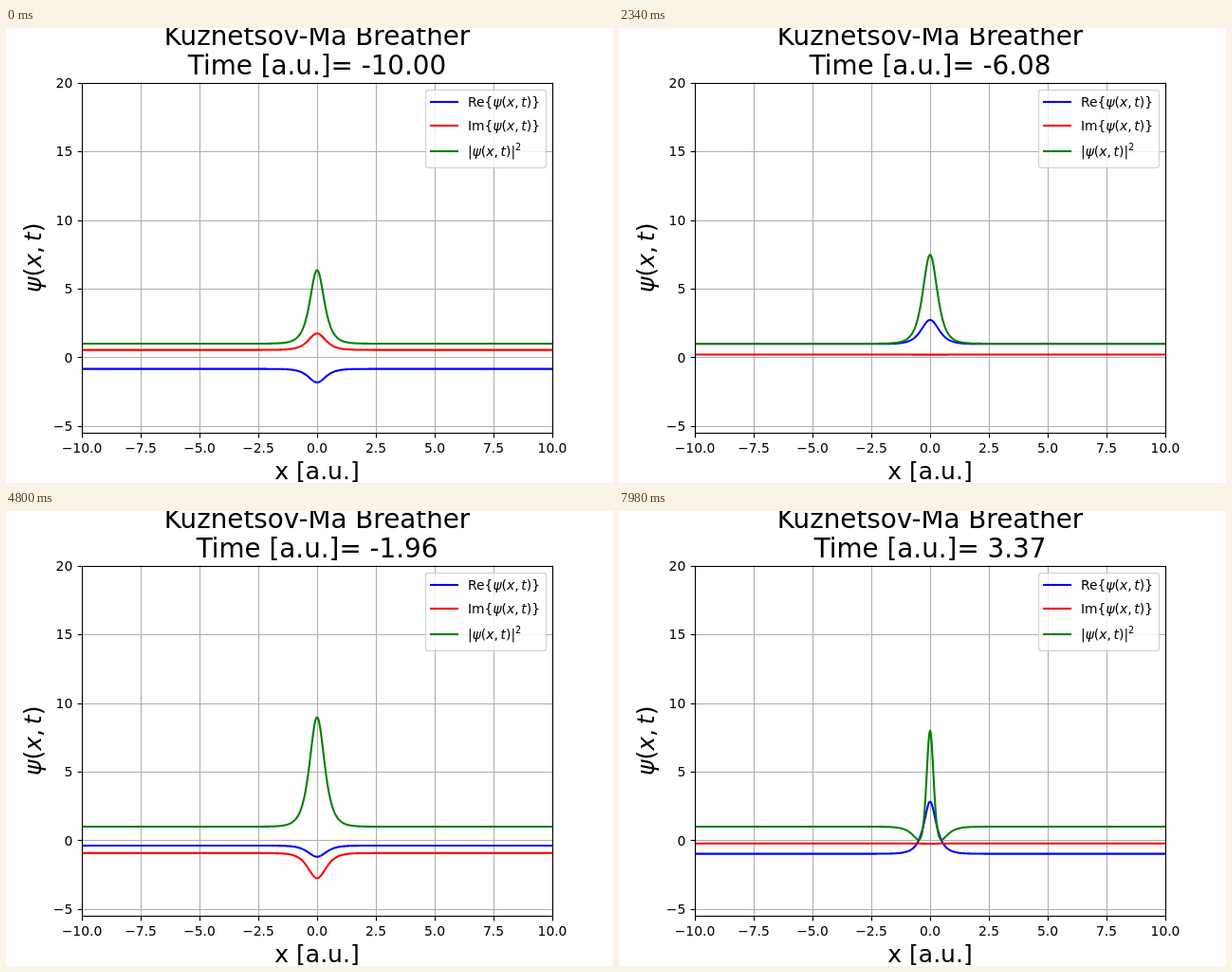
Recreate the animation shown at these times as an HTML page with a canvas. Size 640 by 480 pixels, loop 8 s.

```html
<!DOCTYPE html>
<html lang="en">
<head>
<meta charset="utf-8">
<title>Kuznetsov-Ma Breather</title>
<style>
  html, body { margin: 0; width: 100%; height: 100%; overflow: hidden; background: #fff; }
  canvas { display: block; }
</style>
</head>
<body>
<canvas id="stage" width="640" height="480"></canvas>
<script>
const ctx = document.getElementById('stage').getContext('2d');
const LOOP = 8000, STEP = 60, DT = 20 / 199;
const BOX = { left: 80, right: 576, top: 57.6, bottom: 427.2 };
const PT = 100 / 72;                       // pixels per point
const THIN = 0.8 * PT, THICK = 1.5 * PT, TICK = 3.5 * PT;
const COLORS = ['#0000ff', '#ff0000', '#008000'];

const toX = x => BOX.left + (x + 10) / 20 * (BOX.right - BOX.left);
const toY = y => BOX.bottom - (y + 5.5) / 25.5 * (BOX.bottom - BOX.top);
const snap = v => Math.floor(v + 0.5) + 0.5;
const font = (points, style = '') => `${style} ${points * PT}px "DejaVu Sans", sans-serif`;
const minus = s => s.replace('-', '\u2212');

function line(x1, y1, x2, y2, color, width) {
  ctx.strokeStyle = color;
  ctx.lineWidth = width;
  ctx.beginPath();
  ctx.moveTo(x1, y1);
  ctx.lineTo(x2, y2);
  ctx.stroke();
}

function text(s, x, y, points, align = 'center') {
  ctx.font = font(points);
  ctx.textAlign = align;
  ctx.fillStyle = '#000';
  ctx.fillText(s, x, y);
}

// Variables are oblique, a comma is followed by a thin space, ² is a raised 2.
function math(s, x, y, points) {
  ctx.textAlign = 'left';
  ctx.fillStyle = '#000';
  for (const part of s.match(/[ψxt]|²|,|[^ψxt²,]+/g)) {
    const raised = part === '²';
    const glyphs = raised ? '2' : part;
    ctx.font = font(raised ? points * 0.7 : points, /[ψxt]/.test(part) ? 'oblique' : '');
    ctx.fillText(glyphs, x, raised ? y - 0.43 * points * PT : y);
    x += ctx.measureText(glyphs).width;
    if (part === ',') x += 0.195 * points * PT;
  }
}

// Breather on a unit background: returns [Re, Im, |psi|^2].
const OMEGA = 4 * (Math.SQRT2 - 1), KAPPA = 2 * Math.sqrt(3);
function psi(x, t) {
  const c = Math.cos(OMEGA * t), s = Math.sin(OMEGA * t);
  const d = 2 * Math.cosh(KAPPA * x) - c;
  const a = 1 - 6 * c / d, b = -OMEGA * s / d;
  const re = a * Math.cos(t) - b * Math.sin(t);
  const im = a * Math.sin(t) + b * Math.cos(t);
  return [re, im, re * re + im * im];
}

function drawGrid() {
  for (let x = -10; x <= 10; x += 2.5) {
    const px = snap(toX(x));
    line(px, BOX.top, px, BOX.bottom, '#b0b0b0', THIN);
    line(px, 427.5, px, 427.5 + TICK, '#000', THIN);
    text(minus(x.toFixed(1)), toX(x), 448, 10);
  }
  for (let y = -5; y <= 20; y += 5) {
    const py = snap(toY(y));
    line(BOX.left, py, BOX.right, py, '#b0b0b0', THIN);
    line(80.5 - TICK, py, 80.5, py, '#000', THIN);
    text(minus(String(y)), BOX.left - 2 * TICK, Math.round(toY(y) + 5.1), 10, 'right');
  }
}

function drawCurves(t) {
  ctx.save();
  ctx.beginPath();
  ctx.rect(BOX.left, BOX.top, BOX.right - BOX.left, BOX.bottom - BOX.top);
  ctx.clip();
  ctx.lineWidth = THICK;
  ctx.lineJoin = 'round';
  COLORS.forEach((color, i) => {
    ctx.strokeStyle = color;
    ctx.beginPath();
    for (let n = -500; n <= 500; n++) ctx.lineTo(toX(n / 50), toY(psi(n / 50, t)[i]));
    ctx.stroke();
  });
  ctx.restore();
}

function drawLegend() {
  ctx.beginPath();
  ctx.roundRect(442.5, 65.5, 127, 82, 2.78);
  ctx.fillStyle = 'rgba(255,255,255,0.8)';
  ctx.fill();
  ctx.strokeStyle = 'rgba(204,204,204,0.8)';
  ctx.lineWidth = PT;
  ctx.stroke();
  const rows = [['Re{ψ(x,t)}', 78], ['Im{ψ(x,t)}', 103], ['|ψ(x,t)|²', 130]];
  rows.forEach(([label, y], i) => {
    line(447, y, 477, y, COLORS[i], THICK);
    math(label, 487, y + 5, 10);
  });
}

function draw(t) {
  ctx.fillStyle = '#fff';
  ctx.fillRect(0, 0, 640, 480);
  drawGrid();
  drawCurves(t);
  ctx.strokeStyle = '#000';
  ctx.lineWidth = THIN;
  ctx.strokeRect(80.5, 58.5, 496, 369);
  text('Kuznetsov-Ma Breather', 328, 18, 20);
  text('Time [a.u.]= ' + t.toFixed(2), 328, 49, 20);
  text('x [a.u.]', 328, 476, 18);
  ctx.save();
  ctx.translate(37, 279);
  ctx.rotate(-Math.PI / 2);
  math('ψ(x,t)', 0, 0, 18);
  ctx.restore();
  drawLegend();
}

const start = performance.now();
function frame() {
  const elapsed = (performance.now() - start) % LOOP;
  draw(-10 + Math.floor(elapsed / STEP) * DT);
  requestAnimationFrame(frame);
}
frame();
</script>
</body>
</html>
```
